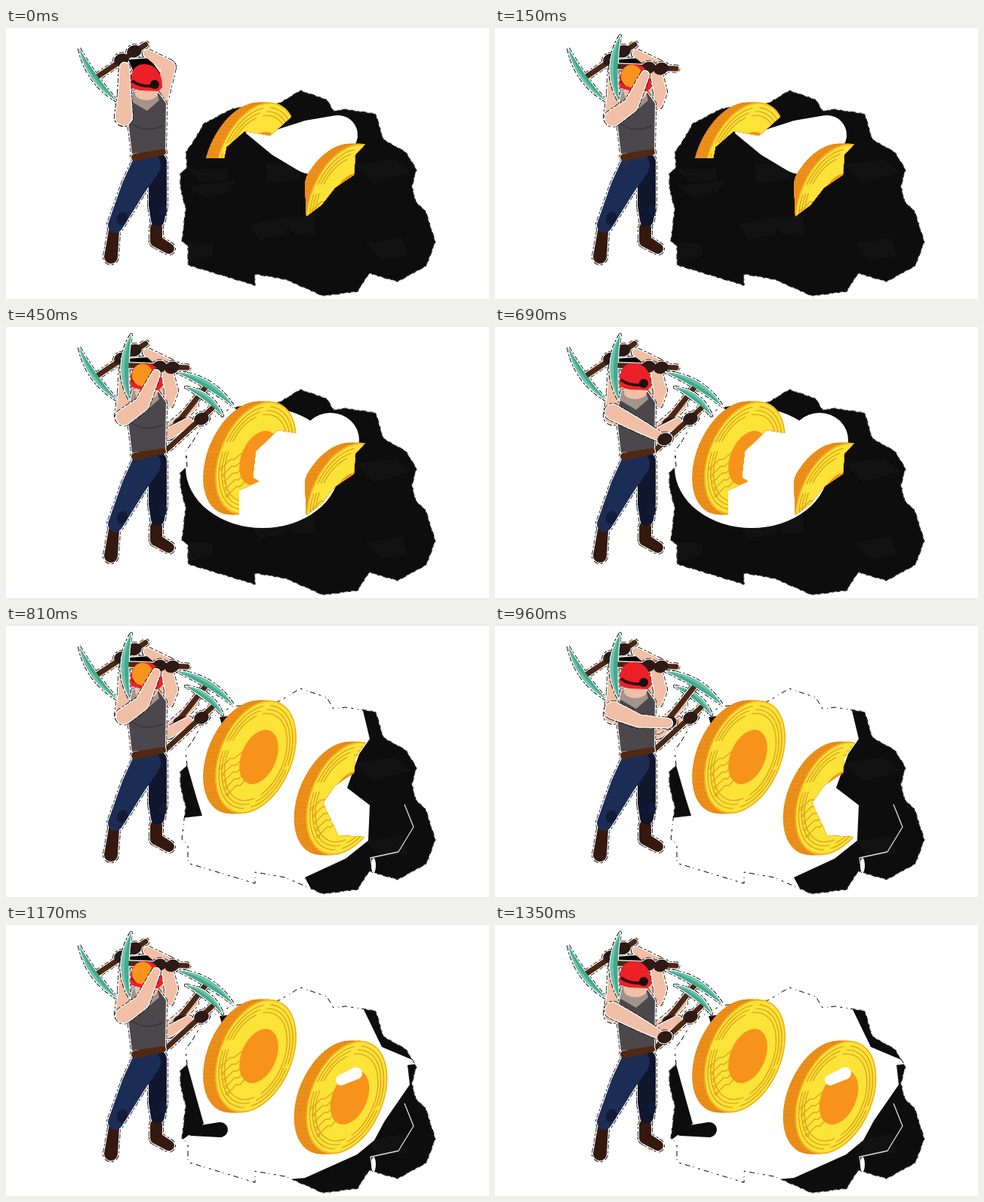
An HTML page with a canvas that plays this animation: 640x360 px, repeating every 1440 ms.

```html
<!DOCTYPE html>
<html lang="en">
<head>
<meta charset="utf-8">
<title>Miner</title>
<style>
html, body { margin: 0; width: 100%; height: 100%; overflow: hidden; background: #fff; }
canvas { display: block; width: 640px; height: 360px; }
</style>
</head>
<body>
<canvas id="stage" width="640" height="360"></canvas>
<script>
const ctx = document.getElementById('stage').getContext('2d');
const LOOP = 1440, SWING = 360, POSE = 90;
const SKIN = '#f0bfa6', WOOD = '#4a2814', GLOVE = '#2e1a15', COAL = '#0e0d0e';
const GOLD = '#dfa51f', BOOT = '#35190f';

const poly = s => new Path2D('M' + s + 'Z');

function dot(x, y, rx, ry = rx, turn = 0) {
  const path = new Path2D();
  path.ellipse(x, y, rx, ry, turn, 0, 7);
  return path;
}

// Chain of tapered capsules through joints [x, y, radius].
function limb(...joints) {
  const path = new Path2D();
  for (let i = 1; i < joints.length; i++) {
    const [x1, y1, r1] = joints[i - 1], [x2, y2, r2] = joints[i];
    const a = Math.atan2(y2 - y1, x2 - x1);
    const o = Math.acos((r1 - r2) / Math.hypot(x2 - x1, y2 - y1));
    path.moveTo(x1 + r1 * Math.cos(a + o), y1 + r1 * Math.sin(a + o));
    path.arc(x1, y1, r1, a + o, a - o + 2 * Math.PI);
    path.arc(x2, y2, r2, a - o, a + o);
    path.closePath();
  }
  return path;
}

function fill(color, path) {
  ctx.fillStyle = color;
  ctx.fill(path);
}

function line(color, width, path, dash = []) {
  ctx.strokeStyle = color;
  ctx.lineWidth = width;
  ctx.lineJoin = 'round';
  ctx.setLineDash(dash);
  ctx.stroke(path);
  ctx.setLineDash([]);
}

// Parts share one ragged cut-out border.
function cutout(parts) {
  for (const [, p] of parts) line('#000', 4, p, [6, 3, 3, 2]);
  for (const [, p] of parts) line('#fff', 2.4, p);
  for (const [c, p] of parts) fill(c, p);
}

const arm = (...joints) => [SKIN, limb(...joints)];
const glove = (x, y) => [GLOVE, dot(x, y, 10, 8, -0.3)];

// The blade runs from tip to tip, bowed outward by the given depth.
function pick([x1, y1], [x2, y2], bow, from, to) {
  const len = Math.hypot(x2 - x1, y2 - y1);
  const ctrl = d => [(x1 + x2) / 2 + (y2 - y1) / len * d, (y1 + y2) / 2 - (x2 - x1) / len * d];
  const blade = inner => new Path2D(`M${x1},${y1}Q${ctrl(bow)} ${x2},${y2}Q${ctrl(inner)} ${x1},${y1}Z`);
  return [
    [WOOD, limb([...from, 3.5], [...to, 3.5])],
    ['#43aa8e', blade(bow * 0.2)],
    ['#6fc3ab', blade(bow * 0.65)]
  ];
}

const raised = arm([157, 52, 6], [157, 90, 8], [156, 118, 11]);
const poses = [
  {
    back: [
      ['#000', poly('162,42 190,40 206,62 168,56')],
      raised, arm([187, 34, 5], [215, 52, 9], [207, 90, 8]),
      ...pick([97, 27], [147, 97], -19, [119, 66], [185, 22]), glove(153, 42), glove(170, 31)
    ],
    front: [raised]
  },
  {
    back: [
      arm([214, 62, 7], [219, 85, 8], [216, 102, 5]),
      ...pick([166, 10], [164, 97], -25, [163, 51], [240, 54]), glove(203, 53), glove(220, 54)
    ],
    front: [arm([156, 120, 10], [180, 103, 9], [199, 62, 5])]
  },
  {
    back: [
      arm([216, 136, 6], [250, 104, 4]),
      ...pick([226, 60], [301, 105], 22, [266, 78], [226, 129]), glove(231, 128)
    ],
    front: [arm([157, 112, 11], [190, 126, 8], [229, 129, 6])]
  },
  {
    back: [
      arm([215, 142, 7], [242, 126, 5]),
      ...pick([238, 80], [287, 118], 19, [273, 108], [214, 162]), glove(259, 122)
    ],
    front: [arm([156, 113, 10], [190, 131, 8], [222, 148, 5]), glove(225, 149)]
  }
];

const body = [
  [BOOT, limb([143, 270, 7], [139, 304, 9])],
  [BOOT, limb([199, 266, 8], [199, 283, 8], [216, 293, 7])],
  ['#11162f', limb([201, 178, 12], [201, 235, 12], [201, 255, 9])],
  ['#1c2d55', limb([186, 182, 19], [169, 212, 16], [145, 262, 10])],
  ['#4c474a', poly('168,90 161,115 167,167 211,162 212,100 202,86 185,98')],
  ['#512813', limb([171, 172, 5], [208, 165, 4])],
  ['#a2948c', poly('168,84 200,85 203,96 187,110 165,97')],
  [SKIN, dot(186, 87, 15, 9)]
];
const dome = new Path2D('M166,80C162,58 172,47 184,48C199,48 208,62 207,79L202,84 178,83Z');
const strap = new Path2D('M167,70Q178,79 200,77');

function helmet(lit) {
  fill('#ed2028', dome);
  if (lit) {
    line('#8e1d16', 5, strap);
    fill('#f7941d', dot(181, 64, 14, 15));
  } else {
    line('#2b1010', 4, strap);
    fill('#17100f', dot(197, 75, 6));
  }
}

function miner(pose, seen) {
  for (let i = 0; i < seen; i++) if (i !== pose) cutout(poses[i].back);
  cutout(poses[pose].back);
  cutout(body);
  fill('#141b38', dot(154, 253, 7, 9, 0.4));
  fill('#141b38', dot(208, 243, 5, 9));
  line('#383438', 1.5, new Path2D('M168,128Q184,140 208,130'));
  helmet(pose === 1);
  cutout(poses[pose].front);
}

const outline = poly('247,153 262,127 300,107 362,100 390,83 425,95 434,110 450,108 490,114 500,148 530,165 544,188 538,210 543,231 556,243 569,284 557,316 519,337 481,326 466,350 420,356 370,334 330,327 330,342 241,315 241,290 233,283 238,240 231,213 231,193 240,185 238,165');
const crack = new Path2D('M528,237L540,267 520,300 483,308 486,327');

let seed = 7;
const rnd = (lo, hi) => {
  seed = (seed * 16807) % 2147483647;
  return lo + (hi - lo) * seed / 2147483647;
};
const facets = Array.from({ length: 9 }, () => {
  const x = rnd(250, 530), y = rnd(150, 310);
  return poly([0, 1, 2, 3].map(i => {
    const a = i * 1.57 + rnd(0, 1);
    return [x + rnd(20, 45) * Math.cos(a), y + rnd(10, 22) * Math.sin(a)];
  }).join(' '));
});

// What each stage has broken out of the rock.
const gap = limb([320, 139, 2], [362, 153, 18], [405, 158, 36], [440, 142, 26]);
const pit = dot(340, 187, 102, 80);
const holes = [
  [gap],
  [pit, dot(430, 150, 38, 36), dot(272, 140, 45)],
  [poly('240,185 253,230 260,252 225,256 225,360 410,360 396,334 450,309 480,285 482,238 452,215 468,170 482,150 470,100 360,75 225,140')],
  [poly('240,185 253,232 262,264 225,292 225,350 396,336 465,305 488,286 502,260 535,212 532,186 550,184 498,162 468,100 360,75 225,140')]
];
const blast = [pit, dot(432, 160, 50, 52), dot(250, 175, 20, 38), dot(428, 227, 5, 9, 0.4), dot(382, 295, 10, 7, -0.5)];
const shard = poly('283,121 299,119 287,134');
const slab = limb([246, 270, 14], [275, 272, 11], [338, 277, 9]);
const splat = limb([246, 274, 6], [284, 272, 10]);

function rocks(stage, hit, growth) {
  fill(COAL, outline);
  ctx.save();
  ctx.clip(outline);
  facets.forEach(f => fill('#131213', f));
  ctx.restore();
  line('#c9c9c9', 0.8, outline);
  holes[stage].forEach(h => fill('#fff', h));
  if (stage === 0 && hit) {
    ctx.save();
    ctx.translate(360, 180);
    ctx.scale(growth, growth);
    ctx.translate(-360, -180);
    blast.forEach(b => fill('#fff', b));
    ctx.restore();
  }
  line('#000', 1, outline, [7, 5, 3, 6, 1, 4]);
  if (stage < 2) return;
  fill(COAL, shard);
  if (stage === 3) fill(COAL, splat);
  else if (hit) fill(COAL, slab);
  line('#ddd', 1.3, crack);
  fill('#fff', dot(487, 318, 3, 10));
}

// Every coin is drawn at the place of the first and then shifted.
function coin(dx, dy, clip) {
  const disc = (k, shift = 0) => dot(331 - shift, 174, 48 * k, 79 * k, 0.4);
  ctx.save();
  if (clip) ctx.clip(clip);
  ctx.translate(dx, dy);
  for (let i = 16; i > 0; i--) fill('#ec8f1a', disc(1, i));
  for (let i = 3; i < 16; i += 4) line('#d67c12', 1.5, disc(0.99, i), [1, 5]);
  fill('#fbe338', disc(1));
  line('#f0ae1e', 1.5, disc(0.985));
  for (let i = 0; i < 3; i++) line(GOLD, 1.4, disc(0.91 - i * 0.07), [70 - i * 12, 9, 95, 14]);
  for (let i = 0; i < 5; i++) {
    const x = 285 + i * 2, y = 188 + i * 9;
    line(GOLD, 1.4, new Path2D(`M${x},${y}l12,-12 l5,0 l${14 - i},-11`));
    line(GOLD, 1.2, dot(x, y, 2));
  }
  line(GOLD, 1.4, new Path2D('M344,172L360,163'));
  fill('#f7931a', disc(0.48, -4));
  ctx.restore();
}

const corner = poly('398,250 396,205 410,150 480,150 463,168 461,195 436,212 418,235');
const coinClips = [
  [poly('255,173 255,90 390,90 378,118 350,143 316,137 292,158 289,173'), corner],
  [poly('255,255 255,90 390,90 390,142 360,137 331,165 327,200 335,205 309,217 309,255'), corner],
  [null, poly('375,310 375,150 480,150 463,175 461,195 436,212 420,235 440,278 475,280 475,310')],
  []
];
const nick = limb([444, 206, 7], [464, 197, 8]);

function draw(now) {
  const t = now % LOOP, beat = t % SWING;
  const stage = Math.floor(t / SWING), pose = Math.floor(beat / POSE);
  ctx.fillStyle = '#fff';
  ctx.fillRect(0, 0, 640, 360);
  rocks(stage, pose === 3, beat < 330 ? 0.8 : 1);
  coin(0, 0, coinClips[stage][0]);
  coin(120.5, 55, coinClips[stage][1]);
  if (stage === 3) fill('#fff', nick);
  miner(pose, stage ? poses.length : pose + 1);
}

const start = performance.now();
function tick() {
  draw(performance.now() - start);
  requestAnimationFrame(tick);
}
tick();
</script>
</body>
</html>
```
